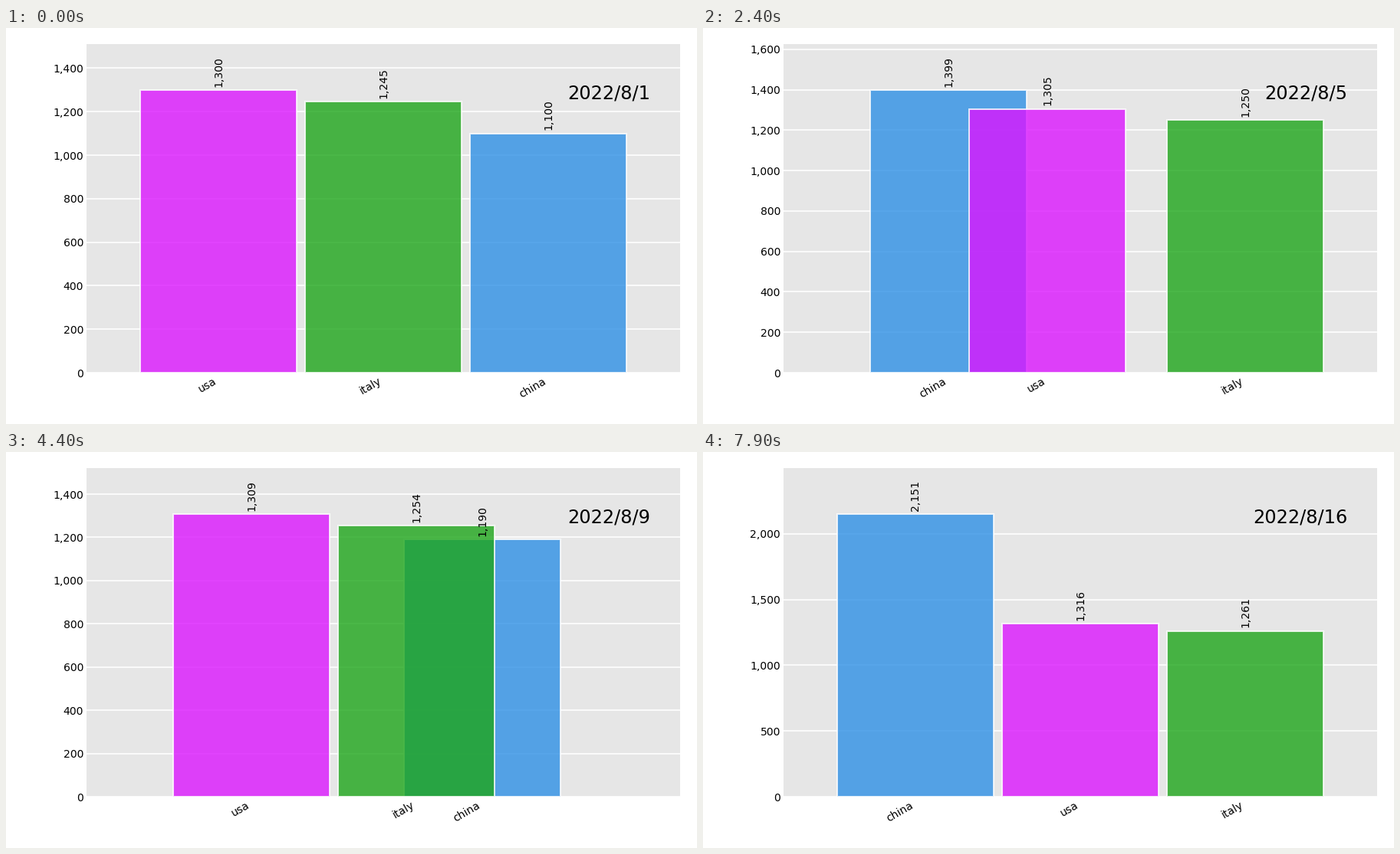
A matplotlib script that plays this animation: 901x517 px, repeating every 8000 ms.

```python
import matplotlib.pyplot as plt
import numpy as np
from matplotlib.animation import FuncAnimation
from matplotlib.ticker import StrMethodFormatter

W, H, DPI = 901, 517, 128
PT = 72 / DPI          # points per pixel
STEPS = 10             # frames per day
DAYS = 16
FRAME_MS = 50

days = np.arange(DAYS + 1)
china = [1100, 1185, 1270, 1170, 1295, 1425, 1420, 1545, 1510,
         1110, 1120, 2345, 2147, 2148, 2149, 2150, 2151]
names = ["china", "italy", "usa"]
colors = ["#2e90e5", "#1ea61a", "#db15ff"]
values = np.column_stack([china, 1245 + days, 1300 + days]).astype(float)
# Position of each bar: 1 is the largest value of the day
ranks = (-values).argsort(axis=1).argsort(axis=1) + 1.0

plt.rcParams["font.family"] = "DejaVu Sans"
fig = plt.figure(figsize=(W / DPI, H / DPI), dpi=DPI, facecolor="white")
ax = fig.add_axes([105 / W, 67 / H, 774 / W, 429 / H], facecolor="0.9")
ax.spines[:].set_visible(False)
ax.set_axisbelow(True)
ax.grid(True, axis="y", color="white", lw=1.6 * PT)
ax.tick_params(labelsize=14 * PT, length=0, pad=4 * PT)
ax.yaxis.set_major_formatter(StrMethodFormatter("{x:,.0f}"))

bars = ax.bar(ranks[0], values[0], width=0.95, color=colors,
              ec="white", lw=2 * PT, alpha=0.8)
labels = [ax.text(0, 0, "", transform=ax.get_xaxis_transform(), rotation=90,
                  size=14 * PT, ha="center", va="bottom") for _ in names]
date = ax.text(0.95, 0.85, "", transform=ax.transAxes, size=24 * PT,
               ha="right", va="center")
ax.set_xlim(0.2, 3.8)


def between(table, day, step):
    return table[day] + (table[day + 1] - table[day]) * step / STEPS


def update(frame):
    day, step = divmod(frame, STEPS)
    heights = between(values, day, step)
    spots = between(ranks, day, step)
    top = heights.max() * 1.162
    ax.set_ylim(0, top)
    for bar, label, x, h in zip(bars, labels, spots, heights):
        bar.set_x(x - bar.get_width() / 2)
        bar.set_height(h)
        label.set_position((x, h / top + 0.01))
        label.set_text(f"{h:,.0f}")
    ax.set_xticks(spots, names, rotation=30, ha="right")
    date.set_text(f"2022/8/{day + 1}")
    return [*bars, *labels, date]


anim = FuncAnimation(fig, update, frames=DAYS * STEPS, interval=FRAME_MS,
                     init_func=lambda: update(0), repeat=True, repeat_delay=0)
plt.show()
```
